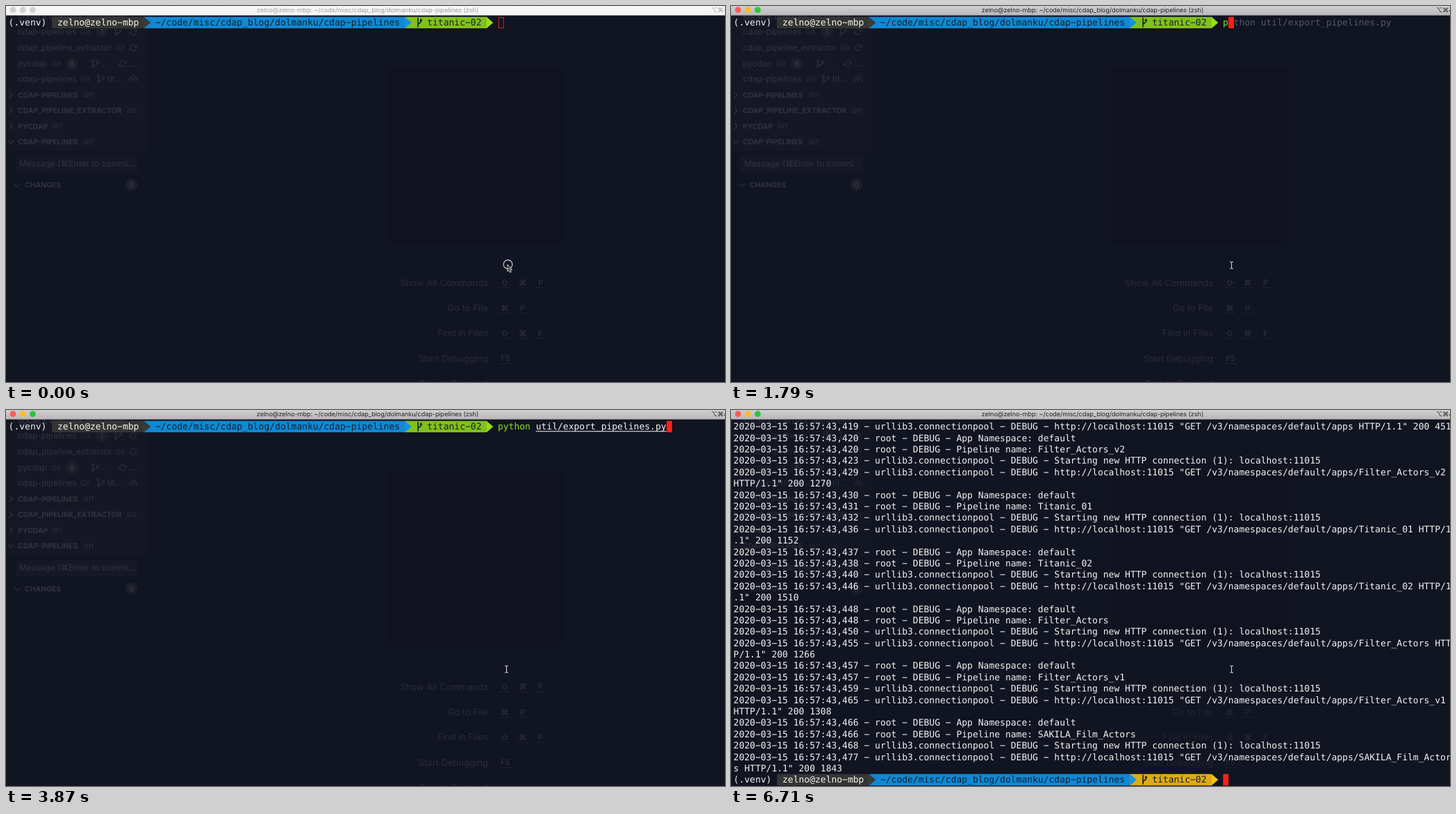
An HTML page with a canvas for the animation above (8000 ms loop, 1035 by 541 pixels).

```html
<!DOCTYPE html>
<html lang="en">
<head>
<meta charset="utf-8">
<title>Terminal</title>
<style>
  html, body { margin: 0; width: 100%; height: 100%; overflow: hidden; background: #111421; }
  canvas { display: block; }
</style>
</head>
<body>
<canvas id="stage" width="1035" height="541"></canvas>
<script>
const W = 1035, H = 541, LOOP = 8000;
const ctx = document.getElementById('stage').getContext('2d');
ctx.textRendering = 'geometricPrecision';

const MONO = '"DejaVu Sans Mono", monospace';
const SANS = 'Inter, "DejaVu Sans", sans-serif';
const CELL = 7.826, LINE = 16.39, LEFT = 3.6, TOP = 15.7, COLS = 132;
const USER = 'zelno', HOST = USER + '-mbp';
const CWD = '~/code/misc/cdap_blog/dolmanku/cdap-pipelines';
const BG = '#111421', WHITE = '#f4f4f4', RED = '#fc2118', GREEN = '#8fdc28', INK = '#14202e';
const GHOST = '#31343f', FAINT = '#2a2d38', EDGE = '#20232e';

// Moments at which the picture changes
const STEPS = [0, 150, 440, 590, 740, 1790, 2090, 2240, 2380, 3870, 6120, 6410, 6710];
const S = { arrow: 1, beam: 2, focus: 3, type: 5, full: 9, run: 10, log: 11, done: 12 };

const colX = c => LEFT + c * CELL;
const rowY = r => TOP + r * LINE;

function rect(x, y, w, h, color) {
  ctx.fillStyle = color;
  ctx.fillRect(x, y, w, h);
}

function disc(x, y, r, color) {
  ctx.fillStyle = color;
  ctx.beginPath();
  ctx.arc(x, y, r, 0, 7);
  ctx.fill();
}

function line(color, width, ...paths) {
  ctx.strokeStyle = color;
  ctx.lineWidth = width;
  ctx.beginPath();
  for (const p of paths)
    for (let i = 0; i < p.length; i += 2) ctx[i ? 'lineTo' : 'moveTo'](p[i], p[i + 1]);
  ctx.stroke();
}

function ring(x, y, r, color, width = 1, from = 0, to = 2 * Math.PI) {
  ctx.strokeStyle = color;
  ctx.lineWidth = width;
  ctx.beginPath();
  ctx.arc(x, y, r, from, to);
  ctx.stroke();
}

function poly(color, ...p) {
  ctx.fillStyle = color;
  ctx.beginPath();
  for (let i = 0; i < p.length; i += 2) ctx.lineTo(p[i], p[i + 1]);
  ctx.closePath();
  ctx.fill();
}

// Interface text, vertically centred on its capitals
function label(str, x, y, size, color, align = 'left', weight = 400) {
  ctx.font = `${weight} ${size}px ${SANS}`;
  ctx.textAlign = align;
  ctx.fillStyle = color;
  ctx.fillText(str, x, y + size * 0.36);
}

// Terminal text on the character grid, with the wide hyphen of the terminal face
function cells(str, col, row, color, weight = 400) {
  ctx.font = `${weight} 13px ${MONO}`;
  ctx.textAlign = 'left';
  ctx.fillStyle = color;
  [...str].forEach((ch, i) => {
    if (ch !== ' ') ctx.fillText(ch === '-' ? '\u2212' : ch, colX(col + i), rowY(row) + 12.6);
  });
}

function branchIcon(x, y) {
  ring(x - 3, y - 4, 1.6, GHOST);
  ring(x - 3, y + 4, 1.6, GHOST);
  ring(x + 4, y - 2, 1.6, GHOST);
  line(GHOST, 1, [x - 3, y - 2.4, x - 3, y + 2.4], [x + 4, y - 0.4, x + 2, y + 2, x - 3, y + 2]);
}

function syncIcon(x, y) {
  ring(x, y, 4.4, GHOST, 1, 3.4, 5.9);
  ring(x, y, 4.4, GHOST, 1, 0.3, 2.8);
  line(GHOST, 1, [x + 6, y - 3, x + 4.4, y, x + 2, y - 1], [x - 6, y + 3, x - 4.4, y, x - 2, y + 1]);
}

function cloudIcon(x, y) {
  ring(x, y - 0.5, 3.6, GHOST, 1, 3.2, 6.2);
  ring(x - 3.5, y + 1, 2.3, GHOST, 1, 1.5, 4.7);
  ring(x + 3.5, y + 1, 2.3, GHOST, 1, 4.7, 7.9);
  line(GHOST, 1, [x, y + 5, x, y - 1], [x - 2, y + 1, x, y - 1, x + 2, y + 1]);
}

function chevron(x, y, open) {
  line(GHOST, 1.1, open ? [x - 4, y - 2, x, y + 2.5, x + 4, y - 2] : [x - 2, y - 4, x + 2, y, x - 2, y + 4]);
}

function badge(str, x, y) {
  disc(x, y, 9, '#1c1f2a');
  label(str, x, y, 11, '#3c3f4a', 'center');
}

function sidebar() {
  rect(0, 13, 203, 195, '#151824');
  label('SOURCE CONTROL PROVIDERS', 17, 16, 10.3, GHOST, 'left', 600);
  [['cdap-pipelines', 107, 37], ['cdap_pipeline_extractor', 157, 60],
   ['pycdap', 65, 83], ['cdap-pipelines', 107, 105]].forEach(([name, gitX, y]) => {
    label(name, 17, y, 12, GHOST);
    label('Git', gitX, y, 11, FAINT);
  });
  badge('1', 138, 37);
  badge('6', 95, 83);
  branchIcon(161, 37);
  branchIcon(128, 83);
  branchIcon(136, 105);
  syncIcon(183, 37);
  syncIcon(183, 60);
  syncIcon(168, 83);
  cloudIcon(183, 105);
  label('...', 138, 83, 12, GHOST);
  label('...', 178, 83, 12, GHOST);
  label('tit...', 146, 105, 12, GHOST);
  [['CDAP-PIPELINES', 112], ['CDAP_PIPELINE_EXTRACTOR', 174],
   ['PYCDAP', 67], ['CDAP-PIPELINES', 112]].forEach(([name, gitX], i) => {
    const y = 128 + i * 22.5;
    chevron(7, y, i === 3);
    label(name, 17, y, 10.4, GHOST, 'left', 700);
    label('GIT', gitX, y, 9.2, FAINT, 'left', 600);
  });
  rect(14, 216, 176, 23, '#161925');
  label('Message (⌘Enter to commi...', 19, 227, 12, GHOST);
  chevron(16, 257.5, true);
  label('CHANGES', 27, 257.5, 10.4, GHOST, 'left', 700);
  badge('0', 180.5, 257);
}

function shortcuts() {
  [['Show All Commands', '⇧⌘P'], ['Go to File', '⌘P'], ['Find in Files', '⇧⌘F'],
   ['Start Debugging', ''], ['Toggle Terminal', '']].forEach(([name, keys], i) => {
    const y = 398 + i * 36.4;
    label(name, 694, y, 13, FAINT, 'right');
    [...keys].forEach((k, j) => {
      const x = 718 + j * 25.7;
      label(k, x, y, 11.5, GHOST, 'center');
      line(EDGE, 1, [x - 8, y + 7.5, x + 8, y + 7.5]);
    });
  });
  label('F5', 719, 507, 11.5, GHOST, 'center');
  line(EDGE, 1, [710, 514.5, 728, 514.5]);
}

function titleBar(focused) {
  const fill = ctx.createLinearGradient(0, 0, 0, 13.5);
  fill.addColorStop(0, focused ? '#d0ced0' : '#f6f6f6');
  fill.addColorStop(1, focused ? '#b9b7b9' : '#f4f4f4');
  rect(0, 0, W, 13.5, fill);
  const lights = focused ? ['#fc5b55', '#fdbc2e', '#2ac63f'] : ['#d2d0d2', '#d2d0d2', '#d2d0d2'];
  lights.forEach((c, i) => disc(10 + i * 14.2, 5.7, 4.4, c));
  const ink = focused ? '#242224' : '#a2a0a2';
  label(`${USER}@${HOST}: ${CWD} (zsh)`, 520.5, 6, 9, ink, 'center');
  label('⌥⌘4', 1015, 6, 9, ink);
}

function segment(from, to, fill, tip, next, row) {
  const y = rowY(row), x = colX(to);
  rect(colX(from), y, x - colX(from), LINE, fill);
  if (next) rect(x - 0.5, y, CELL + 1, LINE, next);
  poly(tip, x - 0.5, y, x + 9, y + LINE / 2, x - 0.5, y + LINE);
}

function prompt(row, fill, tip) {
  const blue = '#1088d4';
  segment(74, 88, fill, tip, null, row);
  segment(26, 73, blue, '#1294e4', fill, row);
  segment(8, 25, '#353633', '#393a37', blue, row);
  cells('(.venv)', 0, row, WHITE);
  cells(`${USER}@${HOST}`, 9, row, WHITE);
  cells(CWD, 27, row, INK);
  const x = colX(75), y = rowY(row);
  line(INK, 1.6, [x + 2.5, y + 1, x + 2.5, y + 15], [x + 6.8, y + 4, x + 6.8, y + 7, x + 2.5, y + 11]);
  poly(INK, x + 4.6, y + 5.5, x + 6.8, y + 2, x + 9, y + 5.5);
  cells('titanic-02', 77, row, INK);
}

function caret(col, row, solid = true) {
  const x = colX(col) + 0.4, y = rowY(row);
  if (solid) return rect(x, y, CELL, LINE, RED);
  ctx.strokeStyle = '#d8261f';
  ctx.lineWidth = 1;
  ctx.strokeRect(x + 1, y + 0.8, CELL - 1, LINE - 1.4);
}

function command(step) {
  const start = 90, path = 'util/export_pipelines.py', text = 'python ' + path;
  if (step < S.type) return caret(start, 0, step >= S.focus);
  if (step < S.full) {
    const n = step - S.type + 1;
    cells(text.slice(n + 1), start + n + 1, 0, '#555962');
    cells(text.slice(0, n), start, 0, n > 1 ? RED : GREEN, n > 1 ? 700 : 400);
    return caret(start + n, 0);
  }
  cells('python', start, 0, GREEN);
  cells(path, start + 7, 0, WHITE);
  rect(colX(start + 7), rowY(0) + 14.5, path.length * CELL, 1, WHITE);
  if (step < S.run) caret(start + text.length, 0);
  else caret(0, 1);
}

const LOG = (() => {
  const at = (ms, who, msg) => `2020-03-15 16:57:43,${ms} - ${who} - DEBUG - ${msg}`;
  const pool = 'urllib3.connectionpool', server = 'localhost:11015';
  const get = (ms, path, size) =>
    at(ms, pool, `http://${server} "GET /v3/namespaces/default/apps${path} HTTP/1.1" 200 ${size}`);
  const out = [get(419, '', 451)];
  [['Filter_Actors_v2', 1270, 420, 420, 423, 429],
   ['Titanic_01', 1152, 430, 431, 432, 436],
   ['Titanic_02', 1510, 437, 438, 440, 446],
   ['Filter_Actors', 1266, 448, 448, 450, 455],
   ['Filter_Actors_v1', 1308, 457, 457, 459, 465],
   ['SAKILA_Film_Actors', 1843, 466, 466, 468, 477]].forEach(([name, size, a, b, c, d]) => out.push(
    at(a, 'root', 'App Namespace: default'),
    at(b, 'root', 'Pipeline name: ' + name),
    at(c, pool, `Starting new HTTP connection (1): ${server}`),
    get(d, '/' + name, size)));
  return out.flatMap(s => s.match(new RegExp(`.{1,${COLS}}`, 'g')));
})();

function pointer(step) {
  if (step < S.beam) {
    const p = [722, 372, 722, 382, 724.2, 380.2, 725.7, 383.4, 727.2, 382.6, 725.8, 379.6, 728.4, 379.4];
    poly('#0a0a0a', ...p);
    line('#f0f0f0', 0.9, [...p, 722, 372]);
  } else {
    line('#d4d4d8', 1.1, [718.2, 367.8, 720.5, 369, 722.8, 367.8], [720.5, 369, 720.5, 377],
      [718.2, 378.2, 720.5, 377, 722.8, 378.2]);
  }
  if (step < S.arrow || step === S.focus) ring(722.5, 371.8, 6.4, '#dcdce0', 1.1);
}

function draw(step) {
  rect(0, 0, W, H, BG);
  ctx.globalAlpha = step < S.log ? 1 : 0.7;
  rect(548, 88, 252, 252, '#10121f');
  sidebar();
  shortcuts();
  ctx.globalAlpha = 1;
  if (step < S.log) {
    prompt(0, '#82c01c', '#96e010');
    command(step);
  } else {
    LOG.forEach((s, i) => cells(s, 0, i, WHITE));
    if (step < S.done) {
      caret(0, LOG.length);
    } else {
      prompt(LOG.length, '#deaa18', '#f6c018');
      caret(90, LOG.length);
    }
  }
  titleBar(step >= S.focus);
  pointer(step);
}

let shown = -1;
const begin = performance.now();
function tick() {
  const t = (performance.now() - begin) % LOOP;
  const step = STEPS.filter(s => s <= t).length - 1;
  if (step !== shown) draw(shown = step);
  requestAnimationFrame(tick);
}
tick();
</script>
</body>
</html>
```
